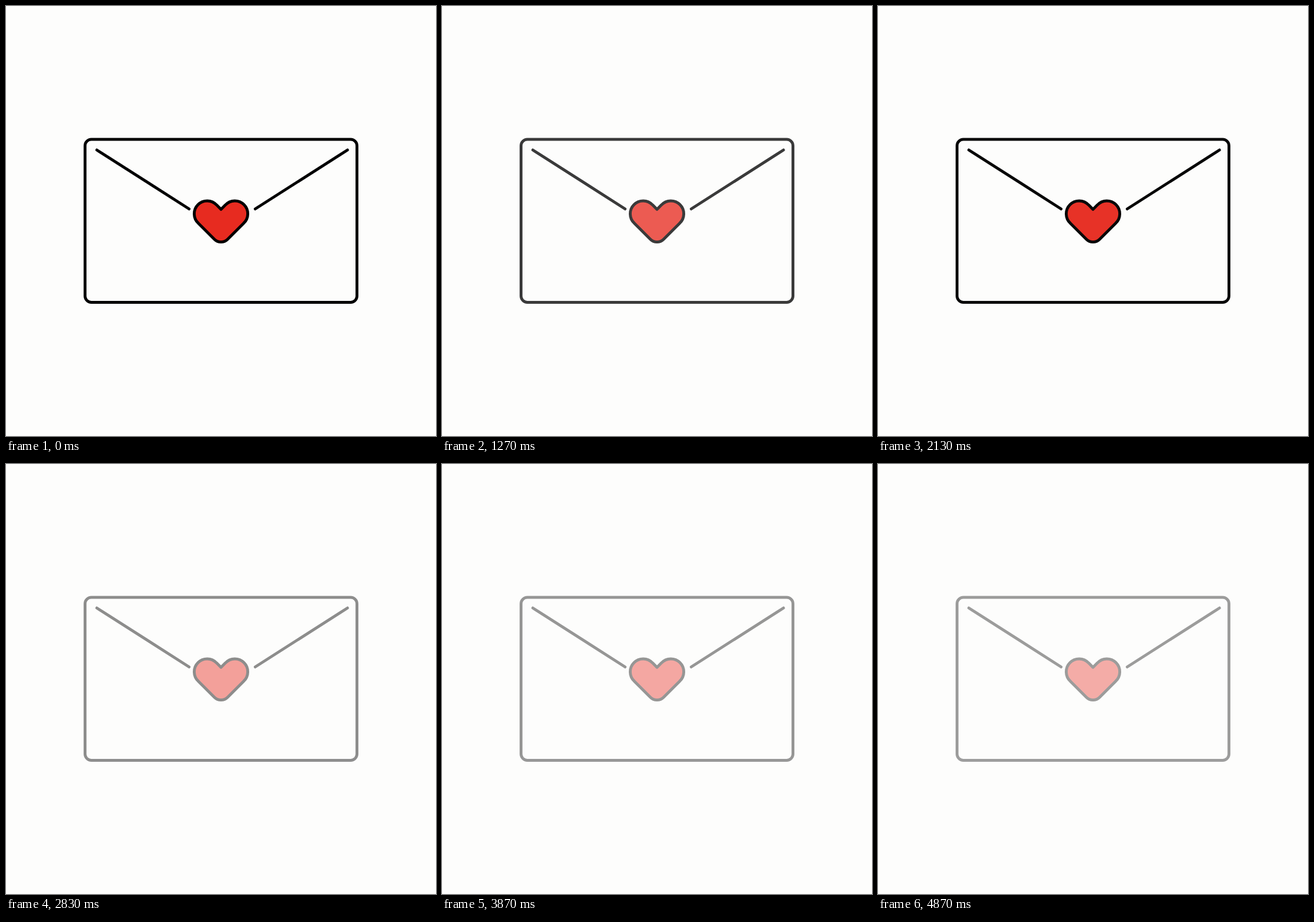
These frames come from a looping animation (748 by 748 pixels, 5.01 s). An HTML page:

```html
<!DOCTYPE html>
<html lang="en">
<head>
<meta charset="utf-8">
<title>Love letter</title>
<style>
  html, body { margin: 0; width: 100%; height: 100%; overflow: hidden; background: #fdfdfc; }
  svg { display: block; width: 100%; height: 100%; }
</style>
</head>
<body>
<svg viewBox="0 0 748 748">
  <g id="letter" fill="none" stroke="#000" stroke-width="5" stroke-linecap="round" stroke-linejoin="round">
    <rect x="137.5" y="232" width="473" height="283.5" rx="11"/>
    <path d="M158 250.5L318.5 353M594 250.5L433.5 353"/>
    <path fill="#e72b20" d="M374 353.7L366.4 346.1A22.5 22.5 0 1 0 334.6 377.9L362.4 405.7
      A16.4 16.4 0 0 0 385.6 405.7L413.4 377.9A22.5 22.5 0 1 0 381.6 346.1Z"/>
  </g>
</svg>
<script>
  const LOOP = 5010, FADE = 542.5, FADES = 9, LOW = 0.38;
  const letter = document.getElementById('letter');
  const ease = u => u * u * (2.3 - 1.3 * u);

  // Fades alternate out and in; the last one rests at its low point.
  function opacityAt(ms) {
    const phase = Math.min(ms / FADE, FADES);
    const level = Math.abs(1 - phase % 2);
    return LOW + (1 - LOW) * ease(level);
  }

  const start = performance.now();
  function draw() {
    letter.setAttribute('opacity', opacityAt((performance.now() - start) % LOOP));
    requestAnimationFrame(draw);
  }
  draw();
</script>
</body>
</html>
```
